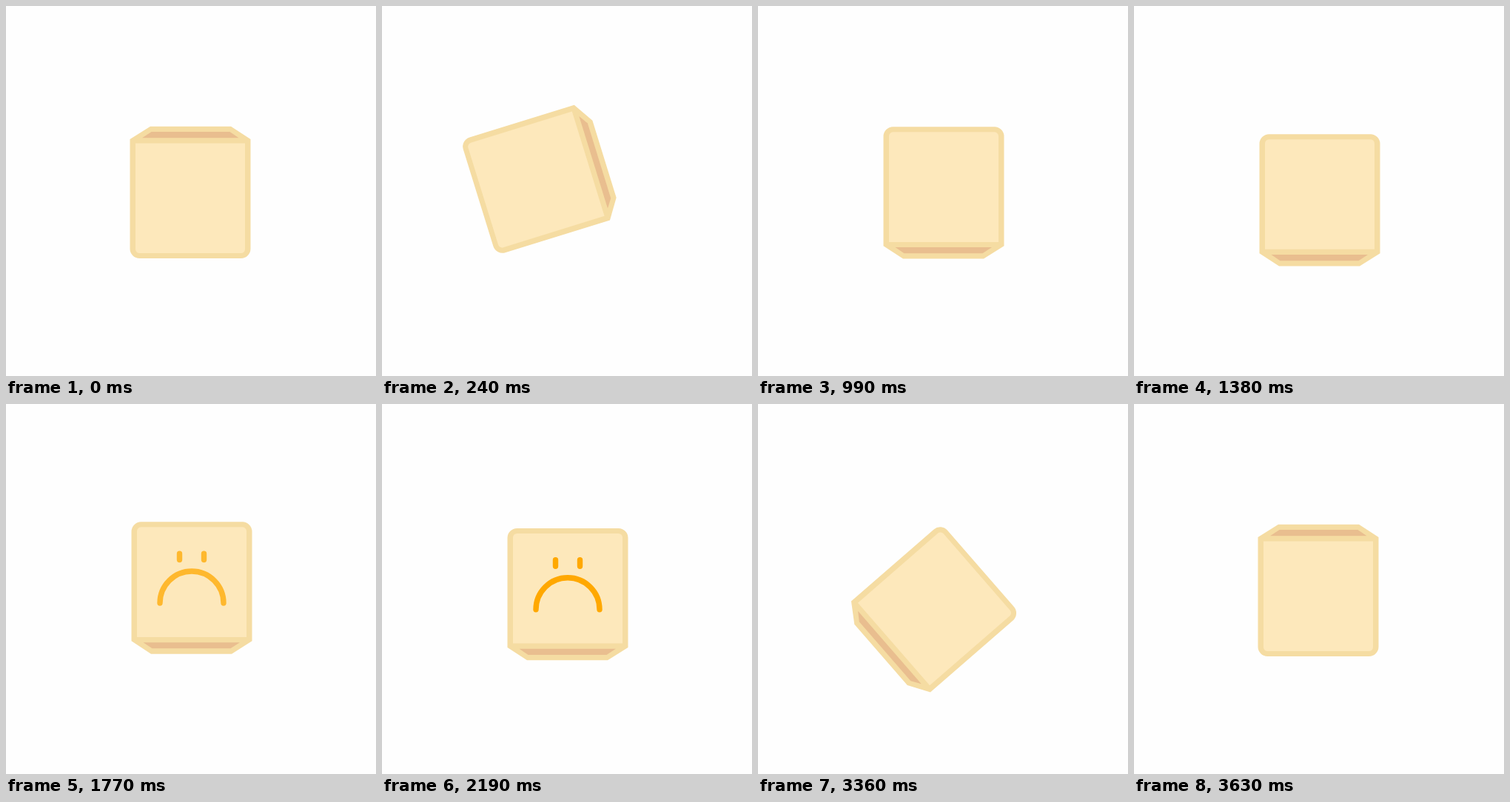
Recreate the animation shown at these times as an HTML page. Size 500 by 500 pixels, loop 4530 ms.

```html
<!DOCTYPE html>
<html lang="en">
<head>
<meta charset="utf-8">
<title>Tumbling box</title>
<style>
  html, body { margin: 0; width: 100%; height: 100%; overflow: hidden; background: #fefefe; }
  svg { display: block; width: 100vw; height: 100vh; }
</style>
</head>
<body>
<svg viewBox="0 0 500 500">
  <g id="box">
    <path fill="#f5dca2" d="M167.5 180L195 162.7H304L330.5 180V328a13 13 0 0 1-13 13H180.5a13 13 0 0 1-13-13z"/>
    <path fill="#e9be8f" d="M184 178.2L196.5 170H302.5L314.5 178.2z"/>
    <path fill="#fde8bb" d="M175 185.4H323V328.5a5.5 5.5 0 0 1-5.5 5.5H180.5a5.5 5.5 0 0 1-5.5-5.5z"/>
    <g id="face" transform="rotate(180 250 252.5)" fill="none" stroke="#ffa800" stroke-width="7.4" stroke-linecap="round">
      <path d="M234.5 206.8v8.4M267.5 206.8v8.4"/>
      <path d="M208 273.7a43 43 0 0 1 86 0"/>
    </g>
  </g>
</svg>
<script>
  const LOOP = 4530, STEP = 30;
  const FLIP = 547, BACK = 3215, REST = 3630;
  const BEAT = 370;                             // time between turns of the bob
  const turns = [12, -2, 12, -7, 4, 4, 11, 12]; // height at each turn

  const box = document.getElementById('box');
  const face = document.getElementById('face');

  const clamp = v => Math.min(1, Math.max(0, v));
  const ease = p => (1 - Math.cos(Math.PI * clamp(p))) / 2;
  const mix = (a, b, p) => a + (b - a) * ease(p);

  // Half a turn along an arc that bulges early and settles softly.
  function flip(p, angle, y0, y1, dx, dy) {
    const bulge = Math.sin(Math.PI * (1 - p) ** 2);
    return { angle: angle + 180 * ease(p), x: dx * bulge, y: mix(y0, y1, p) + dy * bulge };
  }

  function bob(t) {
    const beat = t / BEAT, i = Math.min(Math.floor(beat), turns.length - 2);
    return { angle: 180, x: 0, y: mix(turns[i], turns[i + 1], beat - i) };
  }

  function pose(t) {
    if (t < FLIP) return flip(t / FLIP, 0, 0, turns[0], -42, -28);
    if (t < BACK) return bob(t - FLIP);
    return flip(clamp((t - BACK) / (REST - BACK)), 180, turns[turns.length - 1], 0, -17, 19);
  }

  function draw(now) {
    const t = Math.floor((now % LOOP) / STEP) * STEP;
    const { angle, x, y } = pose(t);
    box.setAttribute('transform', `translate(${x} ${y}) rotate(${angle} 250 252.5)`);
    face.setAttribute('opacity', ease((t - 1650) / 180) * ease((BACK - t) / 150));
  }

  const start = performance.now();
  function tick() {
    draw(performance.now() - start);
    requestAnimationFrame(tick);
  }
  tick();
</script>
</body>
</html>
```
